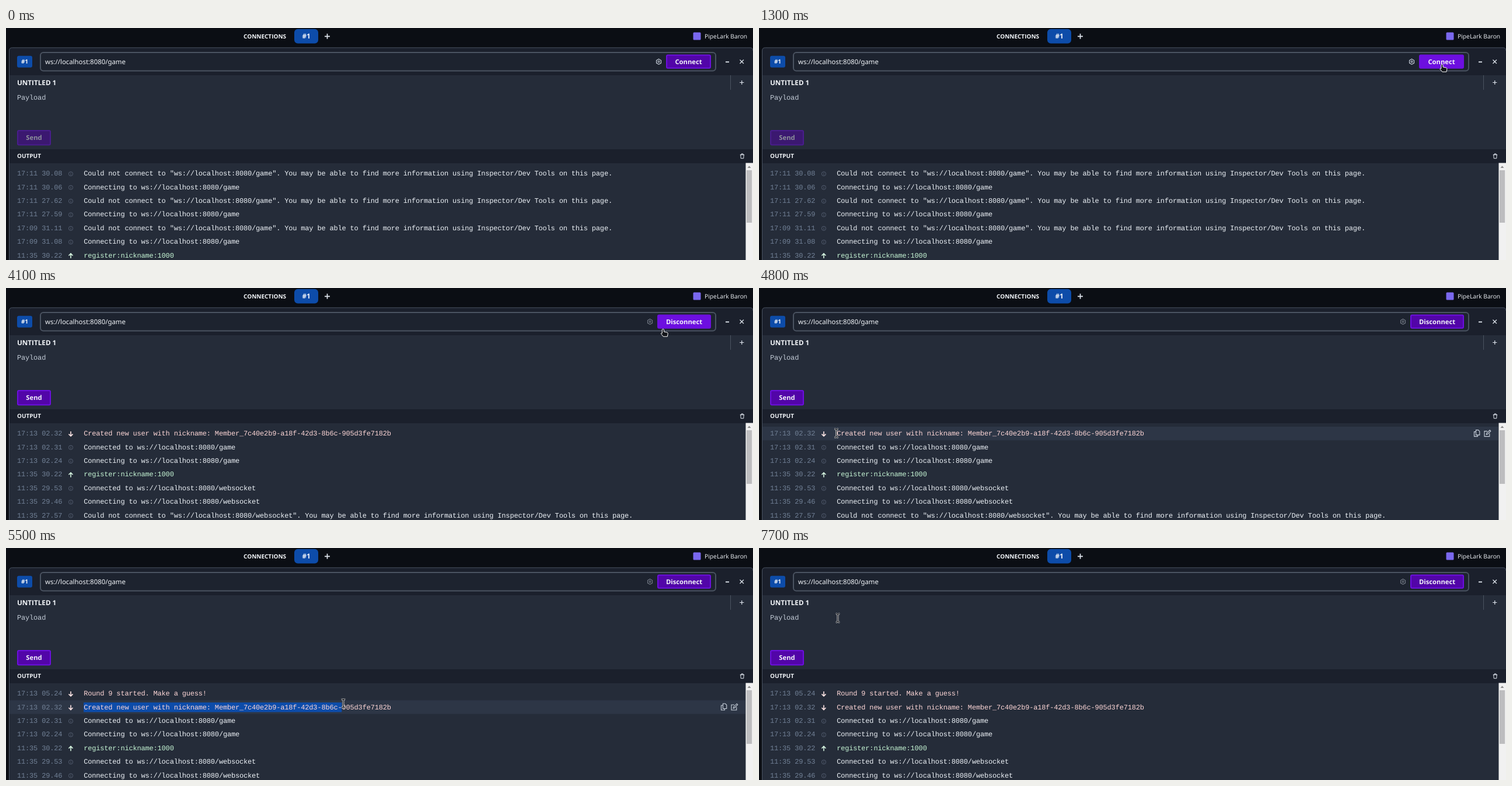
Animation, 1280 px wide and 398 px high, one loop 8 s. Source, as an HTML page:

```html
<!DOCTYPE html>
<html lang="en">
<head>
<meta charset="utf-8">
<title>WebSocket client</title>
<style>
  html, body { margin: 0; width: 100%; height: 100%; overflow: hidden; background: #0b0e14; }
  svg { display: block; width: 100%; height: 100%; }
  text { font-family: "Open Sans", "Noto Sans", sans-serif; fill: #f2f5f9; white-space: pre; text-rendering: geometricPrecision; }
  .b { font-weight: 700; }
  .s { font-size: 10px; }
  .m { font-size: 11.7px; }
  .btn { font-size: 11.25px; font-weight: 700; text-anchor: middle; }
  .url { font: 11.4px "Noto Sans", "Open Sans", sans-serif; }
  .mono { font: 12px "Liberation Mono", monospace; letter-spacing: -.18px; }
  .line { fill: none; stroke: #e2e8f0; stroke-width: 1.2; }
  .blue { fill: #0d4ca9; }
</style>
</head>
<body>
<svg id="stage" viewBox="0 0 1280 398" preserveAspectRatio="none">
  <rect width="1280" height="398" fill="#0b0e14"/>
  <text class="b s" x="407" y="17.6">CONNECTIONS</text>
  <rect class="blue" x="494" y="1.800" width="41" height="24.700" rx="6"/>
  <text class="b m" x="514.500" y="18.200" text-anchor="middle">#1</text>
  <path class="line" d="M546 14.300H555M550.500 9.800V18.800" style="stroke-width:1.7"/>
  <rect x="1177.500" y="7.500" width="13" height="13" rx="1.500" fill="#7a68ee"/>
  <text x="1197" y="17.700" font-size="10.3">PipeLark Baron</text>

  <path d="M5.500 398V39Q5.500 34 10.500 34H1275Q1280 34 1280 39V398Z" fill="#252c39"/>
  <path d="M6 81V39Q6 34 10.500 34H1275Q1280 34 1280 39V81Z" fill="#1b202c"/>
  <rect x="6" y="208" width="1274" height="24" fill="#1b202c"/>
  <path d="M5.500 398V39Q5.500 33.800 10.500 33.800H1275Q1280 33.800 1280 39" fill="none" stroke="#4a5361"/>

  <rect class="blue" x="19" y="47.800" width="26" height="20" rx="3"/>
  <text class="b s" x="32" y="61.400" text-anchor="middle">#1</text>
  <rect x="59" y="42" width="1157" height="31.500" rx="5" fill="#1d232f" stroke="#4a5361" stroke-width="2"/>
  <text class="url" x="67" y="61.700">ws://localhost:8080/game</text>
  <path class="line" d="M1233 58.300H1239" style="stroke-width:1.8"/>
  <path class="line" d="M1257.500 54.500L1264 61M1264 54.500L1257.500 61"/>

  <text class="b m" x="19" y="97.700">UNTITLED 1</text>
  <path d="M1241.500 81V106" stroke="#4a5361"/>
  <path class="line" d="M1257.200 93.500H1264.400M1260.800 89.900V97.100"/>
  <text class="mono" x="19" y="123.400" style="fill:#c3cbd6">Payload</text>
  <rect id="caret" x="19.500" y="114" width="1.200" height="14" fill="#f2f5f9"/>

  <g id="gear" class="line" style="stroke:#cbd3de;stroke-width:1.1">
    <path d="M0 -4.600L4 -2.300V2.300L0 4.600L-4 2.300V-2.300Z"/><circle r="1.500"/>
  </g>
  <rect id="link" y="46.600" height="22.200" rx="2" stroke="#6d0fe0" stroke-width="2"/>
  <text id="linkText" class="btn" y="61.600"></text>
  <g id="send">
    <rect x="20" y="176" width="56" height="24.500" rx="2" fill="#5205a8" stroke="#6d0fe0" stroke-width="2"/>
    <text class="btn" x="48" y="192">Send</text>
  </g>

  <text class="b s" x="19" y="223">OUTPUT</text>
  <path class="line" d="M1257.800 217.500H1265.200M1260 217V215.800H1263V217M1258.800 217.500L1259.200 223.700H1263.800L1264.200 217.500" style="stroke-width:1"/>

  <g id="hover">
    <rect x="6" y="-11.700" width="1261" height="23.400" fill="#2d3646"/>
    <g class="line" style="stroke:#cbd3de;stroke-width:1.1">
      <path d="M1228.500 -6H1232.500L1234.800 -3.700V2.500H1228.500ZM1228 -3H1225.500V5H1231.500V3"/>
      <path d="M1248 -4H1243V5H1251.800V0M1246.300 2L1247 -.8L1252.200 -5.800L1253.800 -4.200L1248.700 1Z"/>
    </g>
  </g>
  <rect id="sel" class="blue" x="133" height="16.500"/>
  <g id="lists"></g>

  <rect x="1267.500" y="231.500" width="12.500" height="167" fill="#f1f1f1"/>
  <path d="M1270.500 240L1273.500 236.500L1276.500 240Z" fill="#8a8a8a"/>
  <rect id="thumb" x="1269" y="244" width="9.200" fill="#bdbdbf"/>

  <g id="cursor" stroke="#fff" stroke-linejoin="round">
    <path id="arrow" d="M.5 .5V13.800L3.300 11.200L5.200 15.500L7.300 14.600L5.400 10.300H8.800Z" fill="#14161b"/>
    <path id="hand" d="M-1.600 1.200Q0 -.8 1.500 1.200V5L7 6.200Q8.600 6.800 8.300 8.500L7.400 13.200H.3L-3.600 8.400Q-3.300 6.500 -1.600 7.600Z" fill="#14161b"/>
    <g id="beam" fill="none">
      <path d="M-3.200 -7.200Q0 -7.200 0 -5.500Q0 -7.200 3.200 -7.200M0 -6V6M-3.200 7.200Q0 7.200 0 5.500Q0 7.200 3.200 7.200" stroke-width="2.800"/>
      <path d="M-3 -7.200Q0 -7.200 0 -5.500Q0 -7.200 3 -7.200M0 -6V6M-3 7.200Q0 7.200 0 5.500Q0 7.200 3 7.200" stroke="#14161b" stroke-width="1.400"/>
    </g>
  </g>
</svg>
<script>
const LOOP = 8000, STEP = 100;
const ROW = 23.4, TOP = 237.9, CHAR = 7.021;
const $ = id => document.getElementById(id);
const set = (el, attrs) => { for (const k in attrs) el.setAttribute(k, attrs[k]); };
const show = (el, on) => { el.style.display = on ? '' : 'none'; };
const rowY = i => TOP + ROW * (i + .5);

// Log entries
const game = 'ws://localhost:8080/game', socket = 'ws://localhost:8080/websocket';
const entry = (kind, time, text) => ({ kind, time, text });
const info = (time, text) => entry('info', time, text);
const connecting = (time, url) => info(time, `Connecting to ${url}`);
const connected = (time, url) => info(time, `Connected to ${url}`);
const failed = (time, url) => info(time, `Could not connect to "${url}". You may be able to find more information using Inspector/Dev Tools on this page.`);

const register = entry('out', '11:35 30.22', 'register:nickname:1000');
const opening = connecting('17:13 02.24', game);
const before = [
  failed('17:11 30.08', game), connecting('17:11 30.06', game),
  failed('17:11 27.62', game), connecting('17:11 27.59', game),
  failed('17:09 31.11', game), connecting('17:09 31.08', game),
  register
];
const joined = [
  entry('in', '17:13 02.32', 'Created new user with nickname: Member_7c40e2b9-a18f-42d3-8b6c-905d3fe7182b'),
  connected('17:13 02.31', game), opening, register,
  connected('11:35 29.53', socket), connecting('11:35 29.46', socket),
  failed('11:35 27.57', socket)
];
const round = entry('in', '17:13 05.24', 'Round 9 started. Make a guess!');
const logs = [before, [opening, ...before], joined, [round, ...joined]];

const colors = { info: '#edf2f7', out: '#c6f6d5', in: '#fed7d7' };
const icons = {
  info: '<g fill="none" stroke="#566073" stroke-width=".9"><circle cx="111" cy=".6" r="3.600"/><path d="M111 0V2.600M111 -1.600V-.8"/></g>',
  out: '<path class="line" style="stroke:#d9f8e3;stroke-width:1.6" d="M111 5V-3M107.500 .5L111 -3L114.500 .5"/>',
  in: '<path class="line" style="stroke:#fde4e4;stroke-width:1.6" d="M111 -3.500V4.500M107.500 1L111 4.500L114.500 1"/>'
};
const rowMarkup = ({ kind, time, text }, i) => `<g transform="translate(0 ${rowY(i)})">
  <text class="mono" x="19" y="3.600" style="fill:#718096">${time}</text>${icons[kind]}
  <text class="mono" x="133.200" y="3.600" style="fill:${colors[kind]}">${text}</text></g>`;
$('lists').innerHTML = logs.map(log => `<g>${log.slice(0, 7).map(rowMarkup).join('')}</g>`).join('');
const lists = [...$('lists').children];

// Pointer moves: start time, steps, end x, end y
const entryPoint = [1090, 400];
const moves = [
  [400, 9, 1168, 65], [1300, 1, 1170.5, 62], [4100, 8, 132.5, 249],
  [5100, 5, 578, 266.5], [5900, 5, 198, 106],
  [6700, 1, 172, 124], [6800, 1, 145, 141],
  [7000, 1, 139, 136], [7100, 1, 136, 131],
  [7300, 1, 136, 125], [7400, 1, 135, 120]
];
const ease = p => p * p * (3 - 2 * p);

function pointer(t) {
  let [x, y] = entryPoint;
  for (const [start, steps, toX, toY] of moves) {
    if (t < start) break;
    const p = ease(Math.min(steps, Math.floor((t - start) / STEP) + 1) / steps);
    x += (toX - x) * p;
    y += (toY - y) * p;
  }
  return [x, y];
}

function draw(t) {
  const [x, y] = pointer(t);
  const visible = t >= 400;
  const online = t >= 2200;
  const state = t < 2100 ? 0 : t < 2200 ? 1 : t < 5200 ? 2 : 3;
  lists.forEach((list, i) => show(list, i === state));

  const left = online ? 1116 : 1131;
  const onButton = visible && x > left && x < 1208 && y > 45 && y < 71;
  set($('link'), { x: left + 1, width: 1206 - left, fill: onButton ? '#6d0fe0' : '#5205a8' });
  set($('linkText'), { x: (left + 1208) / 2 });
  $('linkText').textContent = online ? 'Disconnect' : 'Connect';
  set($('gear'), { transform: `translate(${left - 12.5} 57.800)`, opacity: online ? .5 : 1 });
  set($('send'), { opacity: online ? 1 : .5 });
  set($('thumb'), { height: online ? 92 : 90 });

  const row = Math.floor((y - TOP) / ROW);
  const onRow = visible && row >= 0;
  show($('hover'), onRow);
  if (onRow) set($('hover'), { transform: `translate(0 ${rowY(row)})` });

  const selecting = t >= 5100 && t < 7100;
  show($('sel'), selecting);
  if (selecting) {
    const count = Math.round((pointer(Math.min(t, 5800))[0] - 133.2) / CHAR);
    set($('sel'), { y: rowY(state - 2) - 8, width: count * CHAR });
  }
  show($('caret'), t >= 7100 && t < 7700);

  const onText = (x > 60 && x < left - 20 && y > 42 && y < 73)
    || (y > 107 && y < 165) || (onRow && x > 130);
  const shape = onButton ? 'hand' : onText ? 'beam' : 'arrow';
  show($('cursor'), visible);
  for (const id of ['hand', 'beam', 'arrow']) show($(id), id === shape);
  set($('cursor'), { transform: `translate(${x} ${y})` });
}

const origin = performance.now();
function tick() {
  draw((performance.now() - origin) % LOOP);
  requestAnimationFrame(tick);
}
tick();
</script>
</body>
</html>
```
